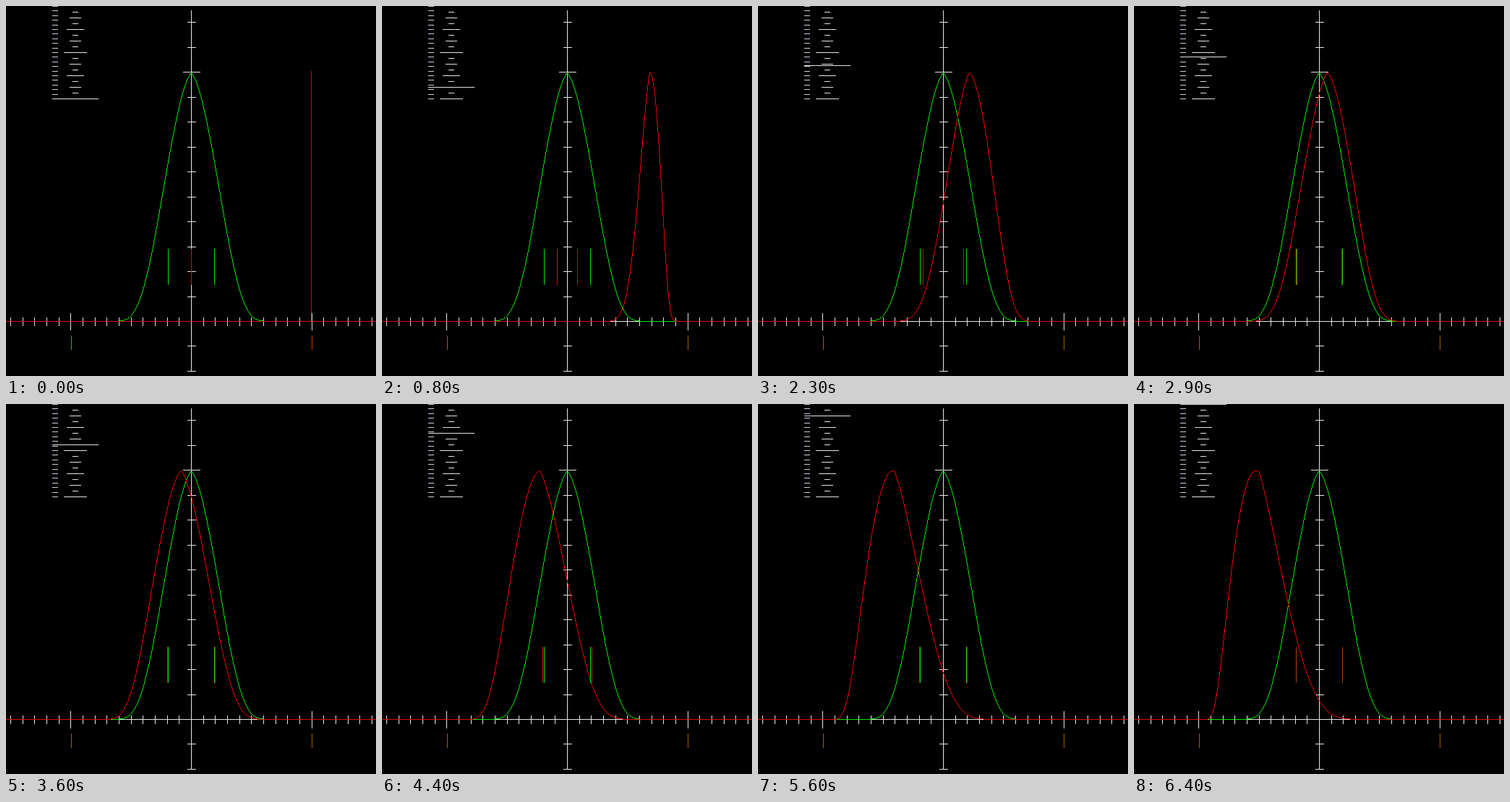
An HTML page with a canvas for the animation above (6500 ms loop, 512 px wide and 512 px high).

```html
<!DOCTYPE html>
<html lang="en">
<head>
<meta charset="utf-8">
<title>Gamma and distribution</title>
<style>
  html, body { margin: 0; width: 100%; height: 100%; overflow: hidden; background: #000; }
  canvas { display: block; width: 100vw; height: 100vh; image-rendering: pixelated; }
</style>
</head>
<body>
<canvas id="stage" width="512" height="512"></canvas>
<script>
const ctx = document.getElementById('stage').getContext('2d');
const STEPS = 65, STEP_MS = 100;
const CX = 256, BASE = 436, PEAK = 344, SPAN = 1000 / 3;
const LEFT = CX - SPAN / 2, SPREAD = 32;
const WHITE = '#e4e4e4', GREEN = '#00e400', RED = '#e40000', MIXED = '#a84000';

function box(color, x, y, w, h) {
  ctx.fillStyle = color;
  ctx.fillRect(x, y, w, h);
}

// Bell with a slight cusp; d is the distance from the centre in pixels.
function bell(d) {
  return Math.exp(-d * (0.0035 + 3.15e-4 * d + 3.2e-10 * d ** 4));
}

// Density of v ** gamma, where v follows the bell around 0.5.
function density(x, gamma) {
  const u = (x - LEFT) / SPAN;
  if (u <= 0 || u >= 1) return 0;
  const v = u ** (1 / gamma);
  return bell(Math.abs(v - 0.5) * SPAN) * v ** (1 - gamma);
}

function deviation(gamma) {
  let n = 0, sum = 0, squares = 0;
  for (let v = 0.0025; v < 1; v += 0.005) {
    const w = bell(Math.abs(v - 0.5) * SPAN), u = v ** gamma;
    n += w;
    sum += w * u;
    squares += w * u * u;
  }
  return Math.sqrt(Math.max(0, squares / n - (sum / n) ** 2));
}
const unitDeviation = deviation(1);

function curve(color, gamma) {
  if (gamma === 0) {
    box(color, 0, BASE, 512, 1);
    box(color, 422, 90, 1, BASE - 90);
    return;
  }
  const values = Array.from({ length: 514 }, (_, i) => density(i - 1, gamma));
  const top = Math.max(...values);
  const ys = values.map(v => Math.round(BASE - PEAK * v / top));
  for (let x = 0; x < 512; x++) {
    const y = ys[x + 1];
    const a = Math.round((ys[x] + y) / 2), b = Math.round((y + ys[x + 2]) / 2);
    const from = Math.min(a, y, b), to = Math.max(a, y, b);
    box(color, x, from, 1, Math.max(1, to - from));
  }
}

function axes() {
  box(WHITE, 6, BASE, 501, 1);
  box(WHITE, CX, 6, 1, 500);
  for (let k = -15; k <= 15; k++) {
    const r = Math.abs(k) === 10 ? 12 : 6;
    box(WHITE, Math.round(CX + k * SPAN / 20), BASE - r + 1, 1, 2 * r);
  }
  for (let k = -2; k <= 12; k++) {
    const r = k === 10 ? 12 : 6;
    box(WHITE, CX - r + 1, Math.round(BASE - 34.48 * k), 2 * r, 1);
  }
}

function slider(step) {
  for (let k = 0; k <= 20; k++) box('#ccd2e4', 64, Math.round(k * 6.4), 8, 1);
  for (let k = 1; k <= 16; k++) {
    const r = k % 8 === 0 ? 16 : k % 4 === 0 ? 12 : k % 2 === 0 ? 8 : 4;
    box(WHITE, 96 - r, k * 8, 2 * r, 1);
  }
  box(WHITE, 64, 128 - 2 * step, 64, 1);
}

function spreadBars(gamma) {
  const spread = SPREAD * deviation(gamma) / unitDeviation;
  for (const side of [-1, 1]) {
    const fixed = CX + side * SPREAD, moving = CX + side * Math.round(spread);
    box(GREEN, fixed, 336, 1, 50);
    box(moving === fixed ? MIXED : RED, moving, 336, 1, 50);
  }
}

function rangeBars(step) {
  box(step ? '#a06000' : '#00c800', 90, 456, 1, 20);
  box(step ? '#a06000' : '#d83000', 423, 456, 1, 20);
}

function draw(step) {
  const gamma = step / 32;
  box('#000', 0, 0, 512, 512);
  axes();
  slider(step);
  curve(GREEN, 1);
  curve(RED, gamma);
  spreadBars(gamma);
  rangeBars(step);
}

let shown = -1;
const start = performance.now();
function tick() {
  const step = Math.floor((performance.now() - start) / STEP_MS) % STEPS;
  if (step !== shown) draw(shown = step);
  requestAnimationFrame(tick);
}
tick();
</script>
</body>
</html>
```
